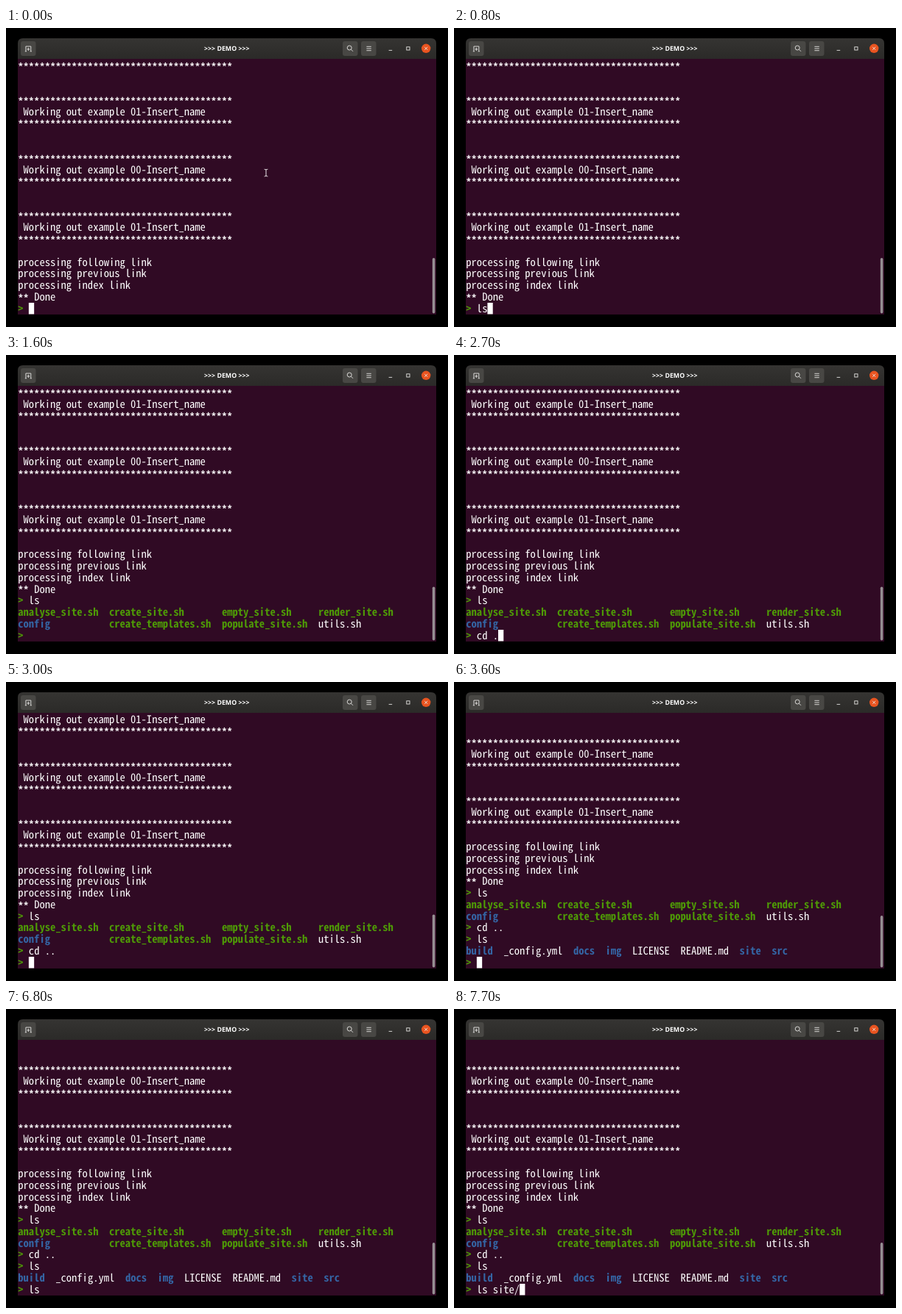
Write an HTML page that moves like this. It is 600x407 px and loops after 8000 ms.

```html
<!DOCTYPE html>
<html lang="en">
<head>
<meta charset="utf-8">
<title>Terminal demo</title>
<style>
  html, body { margin: 0; width: 100%; height: 100%; overflow: hidden; background: #000; }
  svg { display: block; width: 100vw; height: 100vh; }
  text { white-space: pre; text-rendering: geometricPrecision; fill: #fff; }
  .title { font: bold 8.8px "Open Sans", "Noto Sans", sans-serif; text-anchor: middle; }
  .green { fill: #4e9a06; font-weight: bold; }
  .blue { fill: #3465a4; font-weight: bold; }
  .star { font-weight: bold; }
  .icon { fill: none; stroke: #e6e5e3; stroke-width: 0.9; }
</style>
</head>
<body>
<svg viewBox="0 0 600 407">
  <defs>
    <linearGradient id="bar" x2="0" y2="1">
      <stop offset="0" stop-color="#353432"/>
      <stop offset="1" stop-color="#2b2a28"/>
    </linearGradient>
  </defs>
  <rect width="600" height="407"/>
  <path d="M16 42V21q0-7 7-7H577q7 0 7 7V42z" fill="url(#bar)"/>
  <rect x="16" y="42" width="568" height="348" fill="#300a24"/>

  <g fill="#484744">
    <rect x="20" y="18" width="20.5" height="20" rx="3"/>
    <rect x="457" y="18" width="20.5" height="20" rx="3"/>
    <rect x="482" y="18" width="20.5" height="20" rx="3"/>
  </g>
  <g class="icon">
    <path d="M26.9 31.8V25H33.8V31.8M25.8 31.8H28M32.7 31.8H34.9M30.35 26.8V31M28.3 28.9H32.4"/>
    <circle cx="466.2" cy="27" r="3"/>
    <path d="M468.4 29.2L471 31.8M489.4 25.3H495.8M489.4 28H495.8M489.4 30.7H495.8"/>
    <path d="M519.6 30.4H524.2"/>
    <rect x="543.8" y="25.8" width="4.2" height="4.2"/>
  </g>
  <circle cx="570.2" cy="27.8" r="6.2" fill="#e95420"/>
  <path class="icon" d="M568.2 25.8L572.2 29.8M572.2 25.8L568.2 29.8"/>
  <text class="title" x="299.8" y="31">&gt;&gt;&gt; DEMO &gt;&gt;&gt;</text>

  <g id="screen"></g>
  <rect id="cursor" y="374" width="7.3" height="15.5" fill="#fff"/>
  <rect id="scroll" x="578.8" width="3.6" rx="1.8" fill="#968f93"/>
  <path id="pointer" d="M350.6 192.2q2.4 0 2.4 1.4q0-1.4 2.4-1.4M353 193.4V200.8M350.6 202q2.4 0 2.4-1.4q0 1.4 2.4 1.4"
        fill="none" stroke="#d8d0d5" stroke-width="1.1"/>
</svg>
<script>
const LOOP = 8000, LEFT = 16.3, CELL = 7.28, PITCH = 15.75, BASE = 386.5, ROWS = 22;
const byId = id => document.getElementById(id);
const screen = byId('screen'), cursor = byId('cursor'), scroll = byId('scroll'), pointer = byId('pointer');

// Font size that makes one character fill one cell, and the height of an asterisk's centre.
const pen = document.createElement('canvas').getContext('2d');
function fit(weight, family) {
  pen.font = `${weight} 100px ${family}`;
  const m = pen.measureText('*');
  const size = CELL / m.width * 100;
  const middle = (m.actualBoundingBoxAscent - m.actualBoundingBoxDescent) / 200 * size;
  return { family, size, middle };
}
const plain = fit('normal', '"Noto Sans Mono CJK JP", "Noto Sans Mono", monospace');
const starry = fit('bold', '"Noto Sans Mono", "DejaVu Sans Mono", monospace');
const starDrop = starry.middle - 6.8;

// A line is a list of runs: [column, text, style].
const say = text => [[0, text, '']];
const command = text => [[0, '>', 'green'], [2, text, '']];
const stars = [[0, '*'.repeat(40), 'star']];
const example = n => [stars, [[1, `Working out example ${n}-Insert_name`, '']], stars, [], []];

const lines = [
  stars, [], [],
  ...example('01'), ...example('00'), ...example('01').slice(0, 4),
  say('processing following link'),
  say('processing previous link'),
  say('processing index link'),
  [[0, '**', 'star'], [3, 'Done', '']],
  command('ls'),
  [[0, 'analyse_site.sh', 'green'], [17, 'create_site.sh', 'green'],
   [38, 'empty_site.sh', 'green'], [56, 'render_site.sh', 'green']],
  [[0, 'config', 'blue'], [17, 'create_templates.sh', 'green'],
   [38, 'populate_site.sh', 'green'], [56, 'utils.sh', '']],
  command('cd ..'),
  command('ls'),
  [[0, 'build', 'blue'], [7, '_config.yml', ''], [20, 'docs', 'blue'], [26, 'img', 'blue'],
   [31, 'LICENSE', ''], [40, 'README.md', ''], [51, 'site', 'blue'], [57, 'src', 'blue']]
];

// [start, lines scrolled in, typed text, cursor visible]
const steps = [
  [0, 0, '', 1], [700, 0, 'l', 1], [800, 0, 'ls', 1],
  [1000, 3, '', 1], [1600, 3, '', 0],
  [2000, 3, 'c', 1], [2200, 3, 'cd', 1], [2400, 3, 'cd ', 1], [2700, 3, 'cd .', 1], [2900, 3, 'cd ..', 1],
  [3000, 4, '', 1], [3400, 4, 'l', 1], [3500, 4, 'ls', 1],
  [3600, 6, '', 1], [4200, 6, '', 0], [4800, 6, '', 1], [5400, 6, '', 0],
  [6000, 6, 'l', 1], [6200, 6, 'ls', 1], [6800, 6, 'ls', 0], [7000, 6, 'ls ', 1],
  [7200, 6, 'ls si', 1], [7300, 6, 'ls sit', 1], [7700, 6, 'ls site/', 1]
];

function addRun(y, [col, text, style]) {
  const isStar = style === 'star';
  const font = isStar ? starry : plain;
  const el = document.createElementNS('http://www.w3.org/2000/svg', 'text');
  el.setAttribute('x', LEFT + col * CELL);
  el.setAttribute('y', y + (isStar ? starDrop : 0));
  el.setAttribute('class', style);
  el.style.fontFamily = font.family;
  el.style.fontSize = font.size + 'px';
  el.textContent = text;
  screen.append(el);
}

function draw([start, scrolled, typed, lit]) {
  const end = lines.length - 6 + scrolled;
  const rows = [...lines.slice(0, end), command(typed)].slice(-ROWS);
  screen.replaceChildren();
  rows.forEach((row, i) => {
    const y = BASE - (rows.length - 1 - i) * PITCH;
    row.forEach(run => addRun(y, run));
  });
  cursor.setAttribute('x', LEFT + (2 + typed.length) * CELL);
  cursor.setAttribute('visibility', lit ? 'visible' : 'hidden');
  const top = 313 + scrolled * 0.85;
  scroll.setAttribute('y', top);
  scroll.setAttribute('height', 388.5 - top);
  pointer.setAttribute('visibility', start < 700 ? 'visible' : 'hidden');
}

let shown;
function tick() {
  const t = performance.now() % LOOP;
  const step = steps.findLast(s => s[0] <= t);
  if (step !== shown) draw(shown = step);
  requestAnimationFrame(tick);
}
tick();
</script>
</body>
</html>
```
